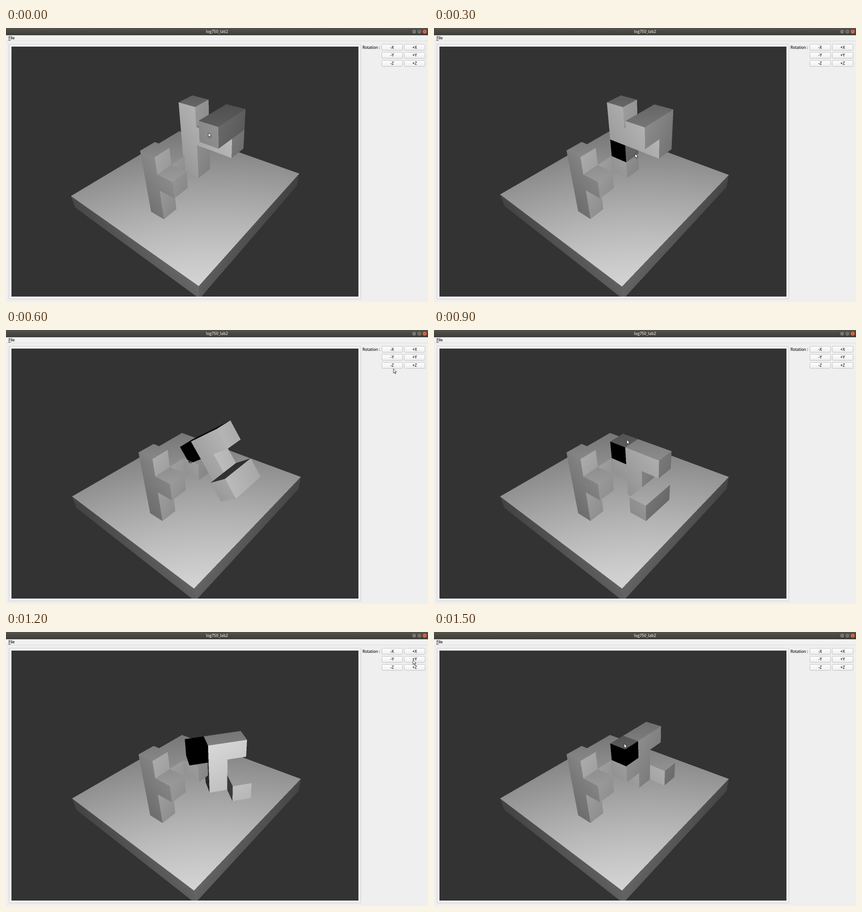
Write an HTML page with a canvas that moves like this. It is 928 px wide and 604 px high and loops after 1800 ms.

```html
<!DOCTYPE html>
<html lang="en">
<head>
<meta charset="utf-8">
<title>log750_lab2</title>
<style>
  html, body { margin: 0; width: 100%; height: 100%; overflow: hidden; background: #efefef; }
  svg, canvas { position: absolute; display: block; }
  svg { left: 0; top: 0; width: 928px; height: 604px; }
  canvas { left: 12px; top: 41px; width: 763px; height: 551px; }
  text { font: 8.6px "Open Sans", "Noto Sans", sans-serif; fill: #111; stroke: #111; stroke-width: .18; }
  .title { font-weight: 600; fill: #dfdbd2; stroke: none; }
  .mid { text-anchor: middle; }
  .pose { visibility: hidden; animation: show 1800ms step-end infinite; }
  @keyframes show {
    0% { visibility: visible; }
    16.6667%, 100% { visibility: hidden; }
  }
</style>
</head>
<body>
<svg viewBox="0 0 928 604">
  <defs>
    <linearGradient id="bar" x2="0" y2="1">
      <stop stop-color="#55534d"/><stop offset="1" stop-color="#3d3c38"/>
    </linearGradient>
    <linearGradient id="btn" x2="0" y2="1">
      <stop stop-color="#ffffff"/><stop offset="1" stop-color="#eeeeee"/>
    </linearGradient>
  </defs>
  <rect width="928" height="604" fill="#efefef"/>
  <rect width="928" height="16" fill="url(#bar)"/>
  <text class="title mid" x="464" y="11">log750_lab2</text>
  <g stroke="#3a3934" stroke-width=".6">
    <circle cx="897.5" cy="8" r="4.5" fill="#807d76"/>
    <circle cx="909" cy="8" r="4.5" fill="#807d76"/>
    <circle cx="920.7" cy="8" r="4.6" fill="#ed6841"/>
    <path d="M895.7 8h3.6M907.4 6.6h3.2v2.8h-3.2zM919.2 6.5l3 3m0-3l-3 3" fill="none"/>
  </g>
  <rect y="16" width="928" height="12" fill="#f2f1f1"/>
  <path d="M0 28.5H928" stroke="#dcdcdc"/>
  <text x="5.5" y="25.3"><tspan text-decoration="underline">F</tspan>ile</text>
  <rect x="6.5" y="35.5" width="774" height="562" rx="1.5" fill="#efefef" stroke="#d2d2d2"/>
  <text x="784" y="45.5">Rotation :</text>
  <g id="buttons"></g>
</svg>
<div id="views"></div>
<svg id="cursors" viewBox="0 0 928 604"></svg>
<script>
const $ = id => document.getElementById(id);
const rad = deg => deg * Math.PI / 180;
const dot = (a, b) => a[0] * b[0] + a[1] * b[1] + a[2] * b[2];
const mix = (a, b, k) => a.map((v, i) => v + b[i] * k);   // a + b * k
const cross = (a, b) => [
  a[1] * b[2] - a[2] * b[1], a[2] * b[0] - a[0] * b[2], a[0] * b[1] - a[1] * b[0]];

const W = 763, H = 551, SCALE = 2;
const FOCAL = H / 2 / Math.tan(rad(22.5));
const DISTANCE = 18.05, ELEVATION = rad(35.5), TARGET = [5, 5, 1];
const WORLD = [[1, 0, 0], [0, 1, 0], [0, 0, 1]];
const BACKGROUND = 51;

// Rows of the view basis: right, down, forward.
function camera(azimuth, roll) {
  const a = rad(azimuth), r = rad(roll), flat = Math.cos(ELEVATION);
  const forward = [flat * Math.cos(a), flat * Math.sin(a), -Math.sin(ELEVATION)];
  const side = [Math.sin(a), -Math.cos(a), 0];
  const down = cross(forward, side);
  const turn = (p, q, s) => mix(p.map(v => v * Math.cos(r)), q, s * Math.sin(r));
  return [turn(side, down, 1), turn(down, side, -1), forward];
}

// Axes of a part tilted about the second axis, then spun about the vertical.
function turned(tilt, spin) {
  const c = Math.cos(rad(tilt)), s = Math.sin(rad(tilt));
  const C = Math.cos(rad(spin)), S = Math.sin(rad(spin));
  return [[c, 0, -s], [0, 1, 0], [s, 0, c]]
    .map(([x, y, z]) => [x * C - y * S, x * S + y * C, z]);
}

const plain = () => 1;
const cube = (center, edge = 1, axes = WORLD, tint = plain) =>
  ({ center, size: [edge, edge, edge], axes, tint });

const floor = { center: [5, 5, -.475], size: [10, 10, .95], axes: WORLD, tint: plain };

const figure = [[0, 0, 0], [0, 0, 1], [0, 0, 2], [0, 0, 3], [1, 0, 2], [0, 1, 2]]
  .map(cell => cube(mix([5.5, 2.5, .5], cell, 1)));

// Cells of the moving part, counted from its joint.
const EDGE = 1.2, PIVOT = [4.6, 6.6, 1.8];
const BODY = [[0, 0, 1], [1, 0, 1], [2, 0, 1], [0, 0, 2]];
const HEAD = [[2, 0, 2], [2, -1, 2]];

function tower({ tilt = 0, spin = 0, picked = true }) {
  const axes = turned(tilt, spin);
  const resting = tilt % 90 === 0 && spin % 90 === 0;
  const place = cell => cell.reduce((p, n, i) => mix(p, axes[i], n * EDGE), PIVOT);
  const part = (cell, tint) => cube(place(cell), EDGE, axes, tint);
  const jointTint = axis => !picked ? 1 : axis === 0 && resting ? .7 : 0;
  return [
    cube(mix(PIVOT, WORLD[2], -EDGE), EDGE),
    part([0, 0, 0], jointTint),
    ...BODY.map(cell => part(cell, plain)),
    ...HEAD.map(cell => part(cell, () => picked ? 1 : .79))
  ];
}

// Fills the visible faces of a box, lit from the eye. Without a depth buffer
// the box stays behind everything drawn later.
function drawBox(pixels, depth, basis, { center, size, axes, tint }) {
  const view = v => basis.map(row => dot(row, v));
  const middle = view(mix(center, TARGET, -1));
  middle[2] += DISTANCE;
  const dirs = axes.map(view);
  const w = W * SCALE, h = H * SCALE;

  for (let k = 0; k < 3; k++) for (const sign of [-1, 1]) {
    const n = dirs[k].map(v => v * sign);
    const p = mix(middle, n, size[k] / 2);
    const plane = dot(n, p);
    if (plane >= 0) continue;

    const i = (k + 1) % 3, j = (k + 2) % 3;
    const a = dirs[i], b = dirs[j], ha = size[i] / 2, hb = size[j] / 2;
    const pa = dot(p, a), pb = dot(p, b);
    const xs = [], ys = [];
    for (const s of [-ha, ha]) for (const t of [-hb, hb]) {
      const c = mix(mix(p, a, s), b, t);
      xs.push((FOCAL * c[0] / c[2] + W / 2) * SCALE);
      ys.push((FOCAL * c[1] / c[2] + H / 2) * SCALE);
    }
    const x0 = Math.max(0, Math.floor(Math.min(...xs)));
    const x1 = Math.min(w, Math.ceil(Math.max(...xs)));
    const y0 = Math.max(0, Math.floor(Math.min(...ys)));
    const y1 = Math.min(h, Math.ceil(Math.max(...ys)));
    const bright = 255 * tint(k);

    for (let py = y0; py < y1; py++) for (let px = x0; px < x1; px++) {
      const x = (px + .5) / SCALE - W / 2, y = (py + .5) / SCALE - H / 2;
      const facing = n[0] * x + n[1] * y + n[2] * FOCAL;
      const t = plane / facing;
      if (facing >= 0 ||
          Math.abs(t * (a[0] * x + a[1] * y + a[2] * FOCAL) - pa) > ha ||
          Math.abs(t * (b[0] * x + b[1] * y + b[2] * FOCAL) - pb) > hb) continue;
      const at = py * w + px;
      if (depth) {
        if (t >= depth[at]) continue;
        depth[at] = t;
      }
      const grey = -facing / Math.sqrt(x * x + y * y + FOCAL * FOCAL) * bright;
      pixels[at * 4] = pixels[at * 4 + 1] = pixels[at * 4 + 2] = grey;
    }
  }
}

function render(canvas, pose) {
  const w = canvas.width = W * SCALE, h = canvas.height = H * SCALE;
  const ctx = canvas.getContext("2d");
  const image = ctx.createImageData(w, h);
  image.data.forEach((_, i, d) => { d[i] = i % 4 === 3 ? 255 : BACKGROUND; });
  const depth = new Float32Array(w * h).fill(Infinity);
  const basis = camera(...pose.camera);
  drawBox(image.data, null, basis, floor);
  for (const box of [...figure, ...tower(pose)]) drawBox(image.data, depth, basis, box);
  ctx.putImageData(image, 0, 0);
}

function add(parent, tag, attrs, text = "") {
  const el = document.createElementNS(parent.namespaceURI, tag);
  for (const k in attrs) el.setAttribute(k, attrs[k]);
  el.textContent = text;
  return parent.appendChild(el);
}

const turnedView = [135.5, 5.2];
const poses = [
  { camera: [133.5, 4.7], picked: false, tip: [445, 231] },
  { camera: turnedView, tip: [442, 277] },
  { camera: turnedView, tilt: 54, tip: [852, 85.5] },
  { camera: turnedView, tilt: 90, tip: [424, 242] },
  { camera: turnedView, tilt: 90, spin: 52, tip: [895, 62] },
  { camera: turnedView, tilt: 90, spin: 90, tip: [418, 246] }
];

poses.forEach((pose, i) => {
  const timing = { class: "pose", style: `animation-delay:${i ? i * 300 - 1800 : 0}ms` };
  render(add($("views"), "canvas", timing), pose);
  add($("cursors"), "path", { ...timing,
    d: "M0 0V9.5L2.2 7.4L3.8 11.2L5.4 10.5L3.8 6.9H6.8Z",
    transform: `translate(${pose.tip})`, fill: "#fff", stroke: "#111", "stroke-width": .8 });
});

["X", "Y", "Z"].forEach((axis, row) => ["-", "+"].forEach((sign, col) => {
  const x = 826.5 + col * 49.5, y = 36 + row * 17.8;
  add($("buttons"), "rect", { x, y, width: 45.5, height: 13, rx: 1.8,
    fill: "url(#btn)", stroke: "#b9b9b9", "stroke-width": .9 });
  add($("buttons"), "text", { class: "mid", x: x + 22.7, y: y + 9.5 }, sign + axis);
}));
</script>
</body>
</html>
```
